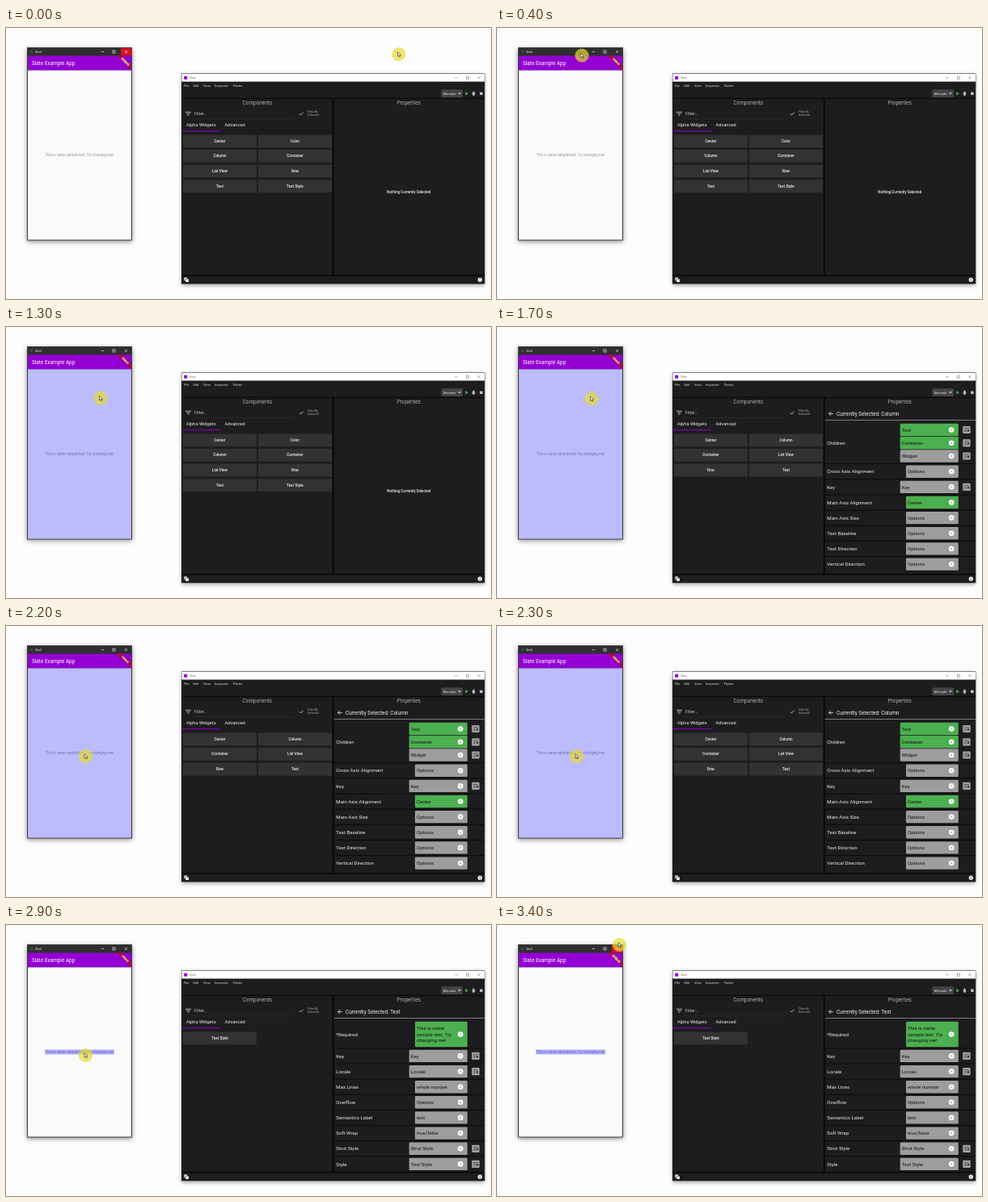
Recreate the animation shown at these times as an HTML page with a canvas. Size 600 by 336 pixels, loop 3500 ms.

```html
<!DOCTYPE html>
<html lang="en">
<head>
<meta charset="utf-8">
<title>Widget inspector</title>
<style>
html, body { margin: 0; width: 100%; height: 100%; overflow: hidden; background: #fdfdfd; }
canvas { display: block; }
</style>
</head>
<body>
<canvas id="stage" width="600" height="336"></canvas>
<script>
const ctx = document.getElementById('stage').getContext('2d');
const LOOP = 3500, STEP = 100;
const GREEN = '#4caf50', GREY = '#9d9d9d', PURPLE = '#9400d3', SELECT = 'rgba(0,0,255,0.25)';

// [time, x, y] stops of the pointer
const path = [
  [0, 486, 32.5], [100, 440, 34], [200, 340, 36], [300, 215, 37], [400, 105, 34],
  [500, 50, 31.5], [600, 42, 31], [700, 118, 31], [800, 143, 31], [900, 149, 31],
  [1000, 143, 46], [1100, 126, 74], [1200, 117, 88], [1800, 117, 89], [1900, 114, 100],
  [2000, 106, 130], [2100, 99, 155], [2200, 98.5, 161.5], [3000, 98.5, 161.5],
  [3100, 98, 176], [3200, 112, 122], [3300, 141, 50], [3400, 151.5, 24.5]
];

const lists = {
  none: ['Center', 'Color', 'Column', 'Container', 'List View', 'Row', 'Text', 'Text Style'],
  column: ['Center', 'Column', 'Container', 'List View', 'Row', 'Text'],
  text: ['Text Style']
};

// [label, value, centre y, wide, green]
const props = {
  column: [
    ['', 'Text', 127.5, 1, 1], ['Children', 'Container', 143.8, 1, 1], ['', 'Widget', 160, 1, 0],
    ['Cross Axis Alignment', 'Options', 179.3, 0, 0], ['Key', 'Key', 198.4, 1, 0],
    ['Main Axis Alignment', 'Center', 217.5, 0, 1], ['Main Axis Size', 'Options', 236.6, 0, 0],
    ['Text Baseline', 'Options', 255.7, 0, 0], ['Text Direction', 'Options', 274.9, 0, 0],
    ['Vertical Direction', 'Options', 294.1, 0, 0]
  ],
  text: [
    ['Key', 'Key', 162.4, 1, 0], ['Locale', 'Locale', 181.6, 1, 0],
    ['Max Lines', 'whole number', 200.7, 0, 0], ['Overflow', 'Options', 219.8, 0, 0],
    ['Semantics Label', 'text', 238.9, 0, 0], ['Soft Wrap', 'true/false', 258.1, 0, 0],
    ['Strut Style', 'Strut Style', 277.3, 1, 0], ['Style', 'Text Style', 296.4, 1, 0]
  ]
};

function rect(x, y, w, h, color) {
  ctx.fillStyle = color;
  ctx.fillRect(x, y, w, h);
}

function round(x, y, w, h, r, color) {
  ctx.fillStyle = color;
  ctx.beginPath();
  ctx.roundRect(x, y, w, h, r);
  ctx.fill();
}

function disc(x, y, r, color) {
  ctx.fillStyle = color;
  ctx.beginPath();
  ctx.arc(x, y, r, 0, Math.PI * 2);
  ctx.fill();
}

function line(points, color, width = 0.7) {
  ctx.strokeStyle = color;
  ctx.lineWidth = width;
  ctx.beginPath();
  points.forEach(([x, y]) => ctx.lineTo(x, y));
  ctx.stroke();
}

// y is the middle of the capitals
function text(s, x, y, size, color, align = 'left', weight = 400) {
  ctx.font = `${weight} ${size}px Roboto, "Open Sans", sans-serif`;
  ctx.textAlign = align;
  ctx.textBaseline = 'alphabetic';
  ctx.fillStyle = color;
  ctx.fillText(s, x, y + size * 0.356);
}

function shadowed(x, y, w, h, color, blur, alpha) {
  ctx.save();
  ctx.shadowColor = `rgba(0,0,0,${alpha})`;
  ctx.shadowBlur = blur;
  ctx.shadowOffsetY = 1.5;
  rect(x, y, w, h, color);
  ctx.restore();
}

function controls(xs, y, color) {
  const [a, b, c] = xs;
  line([[a - 1.7, y], [a + 1.7, y]], color);
  ctx.strokeRect(b - 1.5, y - 1.5, 3, 3);
  line([[c - 1.5, y - 1.5], [c + 1.5, y + 1.5]], color);
  line([[c - 1.5, y + 1.5], [c + 1.5, y - 1.5]], color);
}

function banner(hover) {
  ctx.save();
  ctx.beginPath();
  ctx.rect(27, 34, 128.5, 30);
  ctx.clip();
  ctx.translate(147.6, 41.8);
  ctx.rotate(Math.PI / 4);
  rect(-14, -2.2, 28, 4.4, '#a3123f');
  text('DEBUG', 0, 0, hover ? 4 : 3.4, '#fff', 'center', 900);
  ctx.restore();
}

function drawApp(selected, hover) {
  shadowed(26, 24, 130, 239.5, '#3b3b40', 6, 0.45);
  rect(27, 25, 128, 9.5, '#2f2f31');
  rect(30, 28, 3, 3, '#454548');
  text('Shell', 36, 29.6, 3.8, '#ddd');
  if (hover) rect(142, 25, 13.5, 9.5, '#d8122a');
  controls([119.5, 133.5, 148.5], 29.5, '#e8e8e8');
  rect(27, 34.5, 128, 18, PURPLE);
  text('Slate Example App', 32, 43.3, 6.4, '#fff');
  rect(27, 52.5, 128, 210, '#fafafa');
  text('This is same sample text. Try changing me!', 91, 157.3, 4.47, '#666', 'center', 300);
  if (selected === 'body') rect(27, 52.5, 128, 210, SELECT);
  if (selected === 'text') rect(48, 154.5, 86, 6, 'rgba(0,0,255,0.3)');
  banner(hover);
}

function drawToolbar() {
  ['File:220', 'Edit:231.5', 'View:244', 'Inspector:258', 'Flutter:280.7'].forEach(m => {
    const [s, x] = m.split(':');
    text(s, +x, 71.6, 4.05, '#e0e0e0');
  });
  round(538.5, 76.3, 26.5, 9.6, 1.5, '#444346');
  text('Morvado', 541, 81.2, 3.9, '#eee');
  ctx.fillStyle = '#ccc';
  ctx.fill(new Path2D('M559 80.2h4l-2 2.4z'));
  ctx.fillStyle = GREEN;
  ctx.fill(new Path2D('M568.3 79l3.6 2.3-3.6 2.3z'));
  ctx.fillStyle = '#c8c8c8';
  ctx.beginPath();
  ctx.ellipse(578.5, 81.6, 1.8, 2.4, 0, 0, Math.PI * 2);
  ctx.fill();
  line([[578.5, 78], [578.5, 80]], '#c8c8c8');
  line([[576.3, 81.6], [580.7, 81.6]], '#666', 0.5);
  rect(586.2, 79.6, 3.4, 3.4, '#c8c8c8');
}

function drawComponents(panel) {
  text('Components', 310.8, 93.2, 6.45, '#eee', 'center', 300);
  line([[222, 104.3], [229, 104.3]], '#ddd', 0.8);
  line([[223.3, 106.3], [227.7, 106.3]], '#ddd', 0.8);
  line([[224.6, 108.3], [226.4, 108.3]], '#ddd', 0.8);
  text('Filter...', 233, 106, 5.3, '#c8c8c8');
  rect(230, 112.5, 127, 0.6, '#333');
  line([[363, 106.4], [364.5, 108], [367.6, 104.6]], '#ddd', 0.8);
  text('Filter By', 373, 104, 3.6, '#aaa');
  text('Selected', 373, 108.2, 3.6, '#aaa');
  text('Alpha Widgets', 223, 120.2, 5.7, '#f2f2f2');
  text('Advanced', 270.4, 120.2, 5.75, '#f2f2f2');
  rect(218, 127.2, 47, 1, PURPLE);
  lists[panel].forEach((name, i) => {
    const x = 219 + (i % 2) * 93, y = 132.4 + (i >> 1) * 18.6;
    round(x, y, 91, 15.8, 0.8, '#323133');
    text(name, x + 45.5, y + 7.8, 4.7, '#f2f2f2', 'center', 500);
  });
}

function clearMark(y) {
  disc(562.2, y, 3.3, '#fff');
  line([[561, y - 1.2], [563.4, y + 1.2]], '#777', 0.6);
  line([[561, y + 1.2], [563.4, y - 1.2]], '#777', 0.6);
}

function drawRow([label, value, y, wide, green]) {
  const x = wide ? 498.7 : 506;
  text(label, 408.3, y, 6.12, '#eee');
  round(x, y - 7.7, 570.8 - x, 15.4, 1.2, green ? GREEN : GREY);
  text(value, x + 2, y, 6.1, '#111');
  clearMark(y);
  if (!wide) return;
  round(576.3, y - 4.6, 9.4, 9.2, 0.8, '#a5a5a5');
  line([[578, y - 2], [584, y - 2]], '#333');
  line([[578, y], [581, y]], '#333');
  line([[578, y + 2], [581, y + 2]], '#333');
  rect(581.8, y - 0.4, 2.4, 2.4, '#333');
}

function drawProperties(panel) {
  text('Properties', 498.3, 93.2, 6.45, '#eee', 'center', 300);
  if (panel === 'none') {
    text('Nothing Currently Selected', 498.3, 203.2, 4.5, '#f0f0f0', 'center', 500);
    return;
  }
  const column = panel === 'column';
  line([[415.8, 107.5], [410.8, 107.5]], '#eee', 0.8);
  line([[413.2, 105], [410.7, 107.5], [413.2, 110]], '#eee', 0.8);
  text('Currently Selected: ' + (column ? 'Column' : 'Text'), 420, 107.5, 6.45, '#f2f2f2');
  rect(405.5, 115, 186.5, 1, '#7b7b7d');
  const first = column ? 169.2 : 152.4, count = column ? 7 : 8;
  for (let i = 0; i < count; i++) rect(405.5, first + i * 19.15, 186.5, 0.9, '#090909');
  if (!column) {
    text('*Required', 408.3, 135.6, 6.12, '#eee');
    round(506, 119.8, 64.8, 31.4, 1.2, GREEN);
    ['This is same', 'sample text. Try', 'changing me!'].forEach((s, i) =>
      text(s, 508, 128 + i * 7.5, 6.1, '#111'));
    clearMark(135.5);
  }
  props[panel].forEach(drawRow);
}

function drawInspector(panel) {
  shadowed(217, 56.5, 375.3, 260.8, '#1d1c1e', 5, 0.4);
  rect(217.4, 57, 374.6, 9.5, '#fff');
  rect(220.2, 59.7, 4, 4, PURPLE);
  text('Slate', 227, 61.8, 3.5, '#777');
  controls([557, 571, 585], 61.7, '#8a8a8a');
  rect(217, 86.8, 375, 1, '#050505');
  drawToolbar();
  drawComponents(panel);
  drawProperties(panel);
  rect(404, 87, 1.5, 219.5, '#030303');
  rect(217, 306, 375, 1.2, '#030303');
  rect(220.3, 309.4, 3.8, 3.8, '#ddd');
  rect(221.8, 311, 4.2, 4.2, '#1d1c1e');
  rect(222.3, 311.4, 3.6, 3.6, '#fff');
  disc(586.3, 312.2, 2.6, '#fff');
  rect(585.9, 311.7, 0.8, 2, '#222');
  rect(585.9, 310.5, 0.8, 0.8, '#222');
}

function pointerAt(t) {
  let i = path.length - 1;
  while (path[i][0] > t) i--;
  const a = path[i], b = path[i + 1] || a;
  const k = b === a ? 0 : (t - a[0]) / (b[0] - a[0]);
  return [a[1] + (b[1] - a[1]) * k, a[2] + (b[2] - a[2]) * k];
}

function drawPointer(x, y) {
  disc(x, y, 8.6, 'rgba(230,220,50,0.7)');
  ctx.save();
  ctx.translate(x - 1.4, y - 2.8);
  const arrow = new Path2D('M0 0V5.4L1.3 4.2 2.2 6.2 3.2 5.8 2.3 3.9H4z');
  ctx.fillStyle = '#fff';
  ctx.fill(arrow);
  ctx.strokeStyle = '#222';
  ctx.lineWidth = 0.6;
  ctx.stroke(arrow);
  ctx.restore();
}

function draw(now) {
  const t = Math.floor((now % LOOP) / STEP) * STEP;
  const [x, y] = pointerAt(t);
  const selected = t < 1300 ? '' : t < 2400 ? 'body' : 'text';
  const panel = t < 1400 ? 'none' : t < 2500 ? 'column' : 'text';
  rect(0, 0, 600, 336, '#fdfdfd');
  drawApp(selected, x >= 142 && y < 34);
  drawInspector(panel);
  drawPointer(x, y);
}

const start = performance.now();
function tick() {
  draw(performance.now() - start);
  requestAnimationFrame(tick);
}
tick();
</script>
</body>
</html>
```
